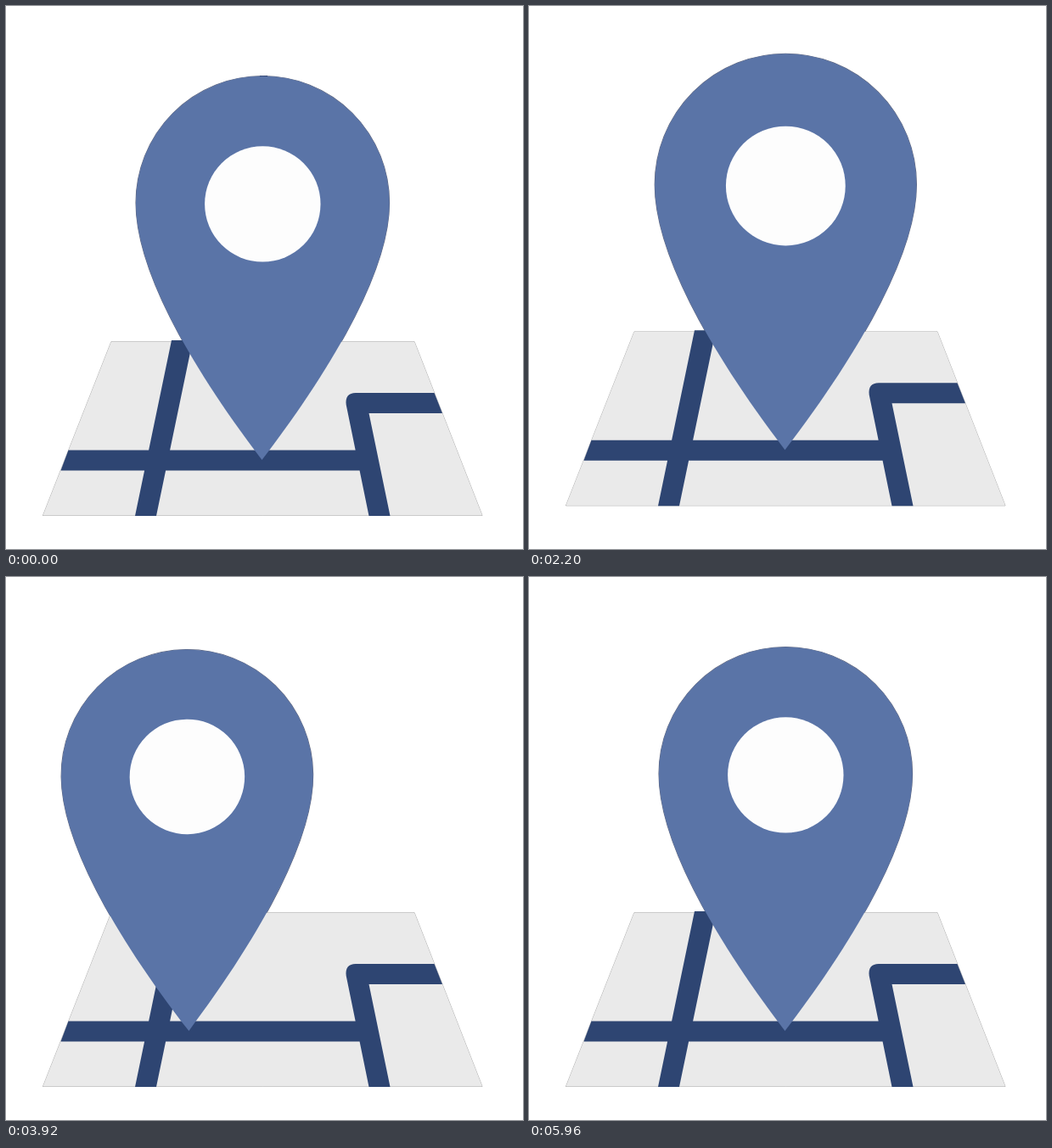
An HTML page with a canvas for the animation above (6000 ms loop, 609 by 640 pixels).

```html
<!DOCTYPE html>
<html>
<head>
<meta charset="utf-8">
<style>
  html, body { margin: 0; width: 100%; height: 100%; overflow: hidden; background: #fff; }
  canvas { display: block; }
</style>
</head>
<body>
<canvas id="stage" width="609" height="640"></canvas>
<script>
const ctx = document.getElementById('stage').getContext('2d');
const LOOP = 6000, STEP = 40;
const BLUE = '#5a74a7', NAVY = '#2e4572';

const land = new Path2D('M124 395.5H481L561 600.5H43.5Z');
const roads = new Path2D(
  'M195 394H220L177 601H152Z' +
  'M73.5 523.5H425V547.5H64.5Z' +
  'M427.5 601L400.7 470Q399 456 412 456H504.5L514 480H427.5L452.5 601Z');
// The pin is drawn around its tip.
const pin = new Path2D(
  'M-148.5 -303A149.3 149.5 0 0 1 150.1 -303C150.1 -228 90 -118 0 0C-90 -118 -148.5 -228 -148.5 -303Z');

// Everything at a given time: each value is a sum of eased moves.
function poseAt(t) {
  const ease = (from, to) => {
    const u = Math.min(1, Math.max(0, (t - from) / (to - from)));
    return (1 - Math.cos(Math.PI * u)) / 2;
  };
  const home = 1 - ease(5070, 5900);
  return {
    // the map bounces down, up and back
    y: 21.5 * ease(0, 680) - 55.2 * ease(680, 1750) + 33.7 * ease(1750, 2500),
    // the tip slides left, right and home
    x: -123.5 * ease(2310, 3210) + 252.5 * ease(3597, 4880) - 129 * (1 - home),
    lean: -4.5 * (ease(2450, 3295) - ease(3450, 4058)) + 5 * ease(4087, 4987) * home,
    // squash and stretch on the bounce, then a slight shrink at each side
    size: 1 - .1 * ease(0, 1050) + .187 * ease(1130, 1643) - .087 * ease(1780, 2500)
      - .03 * (ease(2560, 3500) - ease(3500, 4110)) - .046 * ease(4260, 4880) * home,
    hole: 68.2 * (1 - .022 * (ease(0, 680) - ease(1560, 2000)))
  };
}

function paint(path, color) {
  ctx.fillStyle = color;
  ctx.fill(path);
}

function outline(path, width, color) {
  ctx.lineWidth = width;
  ctx.strokeStyle = color;
  ctx.stroke(path);
}

function withPin({ x, y, lean, size }, draw) {
  ctx.save();
  ctx.translate(301.5 + x, 535 + y);
  ctx.rotate(lean * Math.PI / 180);
  ctx.scale(size, size);
  draw();
  ctx.restore();
}

function drawMap(y) {
  ctx.save();
  ctx.translate(0, y);
  outline(land, .8, 'rgba(0,0,0,.4)');
  paint(land, '#eaeaea');
  paint(roads, NAVY);
  ctx.restore();
}

function drawPin(radius) {
  const hole = new Path2D();
  hole.arc(.8, -301.6, radius, 0, 2 * Math.PI);
  paint(pin, BLUE);
  paint(hole, '#fdfdfd');
}

function render() {
  const t = Math.floor(performance.now() % LOOP / STEP) * STEP;
  const pose = poseAt(t);
  ctx.fillStyle = '#fff';
  ctx.fillRect(0, 0, 609, 640);
  // small dash left behind by the pin until it rises again
  if (t < 1400) {
    ctx.fillStyle = NAVY;
    ctx.fillRect(299, 82, 9, 1);
  }
  withPin(pose, () => outline(pin, 1.1, 'rgba(30,40,75,.7)'));
  drawMap(pose.y);
  withPin(pose, () => drawPin(pose.hole));
  requestAnimationFrame(render);
}
render();
</script>
</body>
</html>
```
